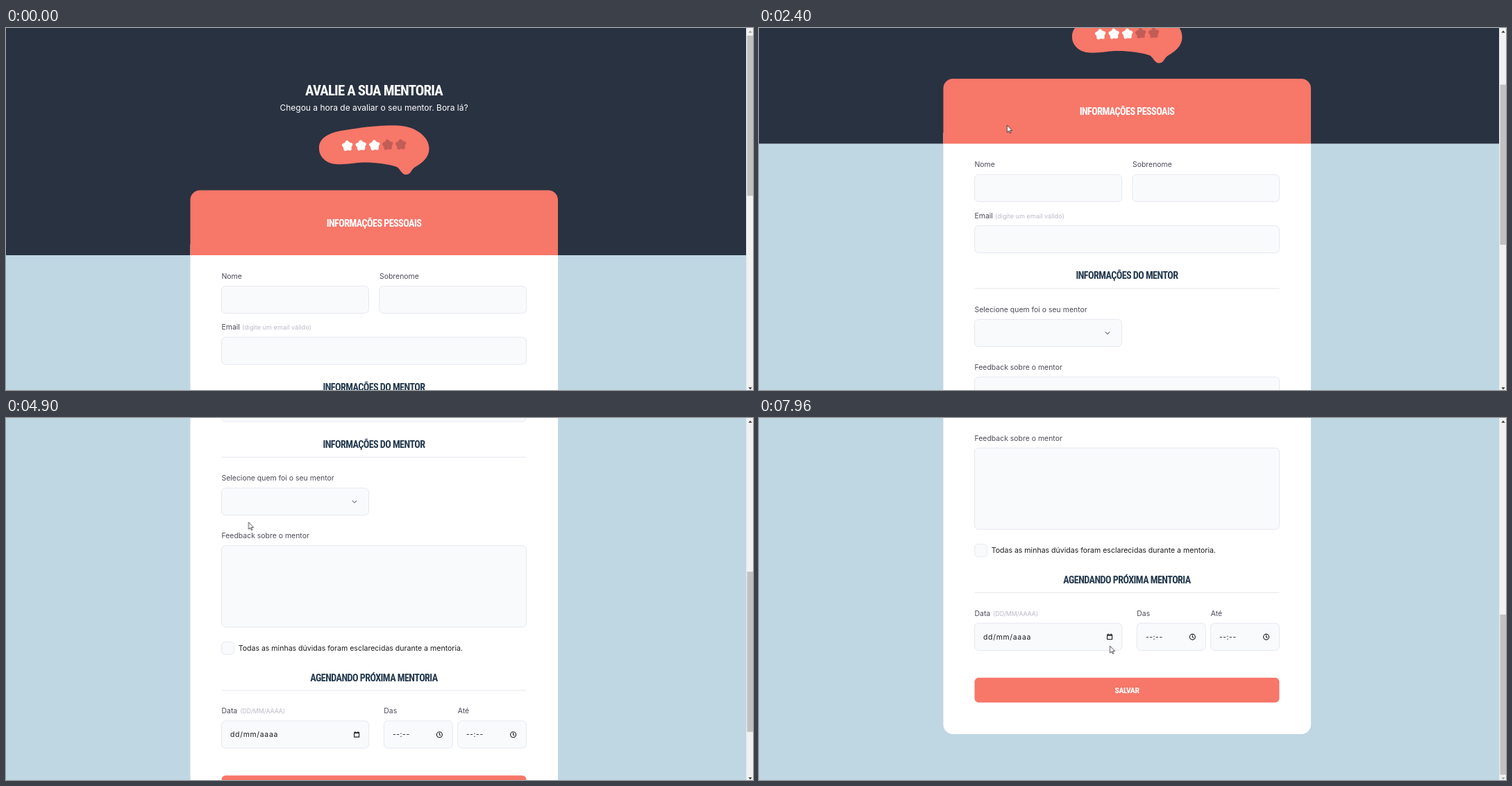
An HTML page for the animation above (7.99 s loop, 1076 by 521 pixels).

```html
<!DOCTYPE html>
<html lang="pt-BR">
<head>
<meta charset="utf-8">
<title>Avalie a sua mentoria</title>
<style>
@property --s { syntax: "<number>"; inherits: true; initial-value: 0; }

html, body { margin: 0; width: 100%; height: 100%; overflow: hidden; background: #bfd6e3; }
svg {
  display: block; width: 1076px; height: 521px;
  --u: 20px; --head: Roboto;
  animation: scroll 7990ms infinite cubic-bezier(.22, .61, .36, 1);
}
text { font: 10.45px Inter, "Open Sans", sans-serif; fill: #4e4958; white-space: pre; }
.hint { font-size: 9.15px; fill: #bab9c8; }
.dark { fill: #1c1c20; }
.lead { font-size: 12px; fill: #fff; text-anchor: middle; }
.head {
  font-family: var(--head), "Roboto Condensed", Roboto, sans-serif;
  font-weight: 700; font-stretch: 62.5%; letter-spacing: -.04em;
  font-size: calc(var(--u) * .68); text-anchor: middle; fill: #24394f;
}
.title { font-size: var(--u); fill: #fff; }
.white { fill: #fff; }
.btn { font-size: calc(var(--u) * .565); }
.box rect { fill: #f9fafc; stroke: #e5e8ef; }
.coral { fill: #f77769; }
.rule { stroke: #e6e8ee; }
.line { fill: none; stroke: #1c1c20; stroke-width: 1.1; }
.star { fill: currentColor; stroke: currentColor; stroke-width: 5; stroke-linejoin: round; }

.page { transform: translateY(calc(var(--s) * -1px)); }
.thumb { transform: translateY(calc(var(--s) * .4387px)); }
.up { animation: up 7990ms infinite step-end; }
.down { animation: down 7990ms infinite step-end; }
.cursor { animation: cursor 7990ms infinite linear; }

/* one wheel notch is about 56.7px */
@keyframes scroll {
  0%, 25.16% { --s: 0; }
  27.03% { --s: 56.7; }
  28.75% { --s: 113.3; }
  31.66%, 39.05% { --s: 170; }
  41.43% { --s: 226.7; }
  43.68% { --s: 283.3; }
  46.81%, 54.19% { --s: 340; }
  56.57%, 57.57% { --s: 396.7; }
  59.95%, 60.94% { --s: 453.4; }
  63.19%, 64.08% { --s: 510; }
  66.83%, 75.97% { --s: 566.7; }
  78.3%, 100% { --s: 619.7; }
}
@keyframes up { 0% { fill: #a3a3a3; } 25.5%, 100% { fill: #303030; } }
@keyframes down { 0% { fill: #303030; } 78%, 100% { fill: #a3a3a3; } }
@keyframes cursor {
  0%, 6.24% { transform: translate(975px, 530px); }
  6.25% { transform: translate(975px, 513px); }
  9.51% { transform: translate(650px, 412px); }
  12.64% { transform: translate(417px, 326px); }
  14.14% { transform: translate(332px, 268px); }
  14.7% { transform: translate(329.5px, 256px); }
  16.02%, 16.2% { transform: translate(352px, 235.5px); }
  17.5% { transform: translate(372px, 200px); }
  18.9% { transform: translate(341px, 152px); }
  20.5%, 33.2% { transform: translate(357.5px, 140px); }
  35.3%, 37% { transform: translate(355px, 140px); }
  37.3%, 39.1% { transform: translate(354px, 140.5px); }
  45.5%, 49.5% { transform: translate(351.5px, 147px); }
  49.7%, 54.2% { transform: translate(351px, 147.5px); }
  61%, 85.8% { transform: translate(349.5px, 150px); }
  87% { transform: translate(349px, 146.5px); }
  90% { transform: translate(338.5px, 200px); }
  92.5% { transform: translate(354px, 272px); }
  96% { transform: translate(428px, 333px); }
  98% { transform: translate(475px, 336px); }
  99.5%, 100% { transform: translate(505.5px, 328px); }
}
</style>
</head>
<body>
<svg viewBox="0 0 1076 521">
  <defs>
    <path id="star" class="star"/>
    <g id="clock" class="line"><circle r="4"/><path d="M0-2.6V.2L1.8 1.4"/></g>
  </defs>

  <g class="page">
    <rect width="1066" height="327" fill="#293241"/>
    <text class="head title" x="530" y="90" dy=".355em">AVALIE A SUA MENTORIA</text>
    <text class="lead" x="530" y="114.7" dy=".36em">Chegou a hora de avaliar o seu mentor. Bora lá?</text>

    <path class="coral" d="M451 174C450 160 462 152 482 148C515 142 545 139.5 566 140.5C592 142 610 158 609.5 174C609 189 596 196 588 201C583 205 583 211 576 211C570 211 568 203 563 200C548 195 520 192 502 194.5C488 196 480 197 471 195.5C459 193 451 184 451 174Z"/>
    <g color="#fff">
      <use href="#star" x="491.7" y="169.8"/>
      <use href="#star" x="511.3" y="169.2"/>
      <use href="#star" x="530.8" y="169"/>
    </g>
    <g color="#c25d56">
      <use href="#star" x="549.8" y="168.3"/>
      <use href="#star" x="568.8" y="167.9"/>
    </g>

    <rect class="white" x="265.5" y="300" width="529.5" height="774.7" rx="14"/>
    <path class="coral" d="M265.5 327V247.5a14 14 0 0 1 14-14H781a14 14 0 0 1 14 14V327Z"/>
    <text class="head white" x="530" y="281" dy=".355em">INFORMAÇÕES PESSOAIS</text>

    <g class="box">
      <rect x="310.5" y="371.5" width="212" height="39" rx="6"/>
      <rect x="537.8" y="371.5" width="211.7" height="39" rx="6"/>
      <rect x="310.5" y="445" width="439" height="39.2" rx="6"/>
      <rect x="310.5" y="580" width="212" height="39" rx="6"/>
      <rect x="310.5" y="662.8" width="439" height="117.2" rx="6"/>
      <rect x="310.7" y="801.3" width="18" height="18.2" rx="5"/>
      <rect x="310.5" y="915" width="212.3" height="39.2" rx="6"/>
      <rect x="544.3" y="915" width="99" height="39.2" rx="6"/>
      <rect x="650.7" y="915" width="98.8" height="39.2" rx="6"/>
    </g>

    <text x="310.5" y="357" dy=".36em">Nome</text>
    <text x="538" y="357" dy=".36em">Sobrenome</text>
    <text x="310.5" y="430.7" dy=".36em">Email</text>
    <text class="hint" x="340" y="431.2" dy=".36em">(digite um email válido)</text>

    <text class="head" x="530" y="517" dy=".355em">INFORMAÇÕES DO MENTOR</text>
    <path class="rule" d="M310.5 535.5H749.5M310.5 871H749.5"/>
    <text x="310.5" y="565.5" dy=".36em">Selecione quem foi o seu mentor</text>
    <path class="line" style="stroke:#70707c" d="M498.8 598l3.2 3.2 3.2-3.2"/>
    <text x="310.5" y="648.6" dy=".36em">Feedback sobre o mentor</text>
    <text class="dark" x="334.7" y="810.2" dy=".36em" style="font-size:10.55px">Todas as minhas dúvidas foram esclarecidas durante a mentoria.</text>

    <text class="head" x="530" y="852.6" dy=".355em">AGENDANDO PRÓXIMA MENTORIA</text>
    <text x="310.5" y="900.8" dy=".36em">Data</text>
    <text class="hint" x="337.3" y="901.2" dy=".36em" style="font-size:8.7px">(DD/MM/AAAA)</text>
    <text x="544.3" y="900.8" dy=".36em">Das</text>
    <text x="650.7" y="900.8" dy=".36em">Até</text>
    <text class="dark" x="323" y="934.7" dy=".36em" letter-spacing=".7">dd/mm/aaaa</text>
    <text class="dark" x="557" y="934.7" dy=".36em" letter-spacing=".5">--:--</text>
    <text class="dark" x="663" y="934.7" dy=".36em" letter-spacing=".5">--:--</text>
    <path class="line" d="M501.6 931.8h7v6.4h-7zM501.6 932.6h7M503.1 930v2M507.1 930v2"/>
    <use href="#clock" x="624.4" y="934.8"/>
    <use href="#clock" x="730.6" y="934.8"/>

    <rect class="coral" x="310.5" y="993.5" width="439" height="35.8" rx="6"/>
    <text class="head white btn" x="530" y="1011.2" dy=".355em">SALVAR</text>
  </g>

  <rect x="1066.3" width="9.7" height="521" fill="#f1f1f1"/>
  <rect class="thumb" x="1067.5" y="11" width="8.5" height="230.5" fill="#c1c1c1"/>
  <path class="up" d="M1069.3 6.8h5.4l-2.7-3z"/>
  <path class="down" d="M1069.3 517.2h5.4l-2.7 3z"/>

  <path class="cursor" d="M0 0V10.2L2.4 8.1 4 11.5 5.4 10.9 3.9 7.6 7 7.4Z" fill="#fff" stroke="#15151a" stroke-width=".75"/>
</svg>
<script>
const svg = document.querySelector("svg");
const title = document.querySelector(".title");

// rounded five-pointed star
const tip = i => {
  const a = i * Math.PI / 5 - Math.PI / 2 - .08, r = i % 2 ? 3.4 : 5.4;
  return `${(r * Math.cos(a)).toFixed(2)} ${(r * Math.sin(a)).toFixed(2)}`;
};
document.getElementById("star").setAttribute("d", "M" + [...Array(10).keys()].map(tip).join("L") + "Z");

// headings use the narrowest face at hand, sized from the title
const faces = ["Roboto Condensed", "Roboto", "Open Sans", "Noto Sans"].map(name => {
  svg.style.setProperty("--head", `"${name}"`);
  return { name, width: title.getComputedTextLength() };
}).sort((a, b) => a.width - b.width);
svg.style.setProperty("--head", `"${faces[0].name}"`);
svg.style.setProperty("--u", Math.min(25.5, 20 * 198 / faces[0].width) + "px");
</script>
</body>
</html>
```
